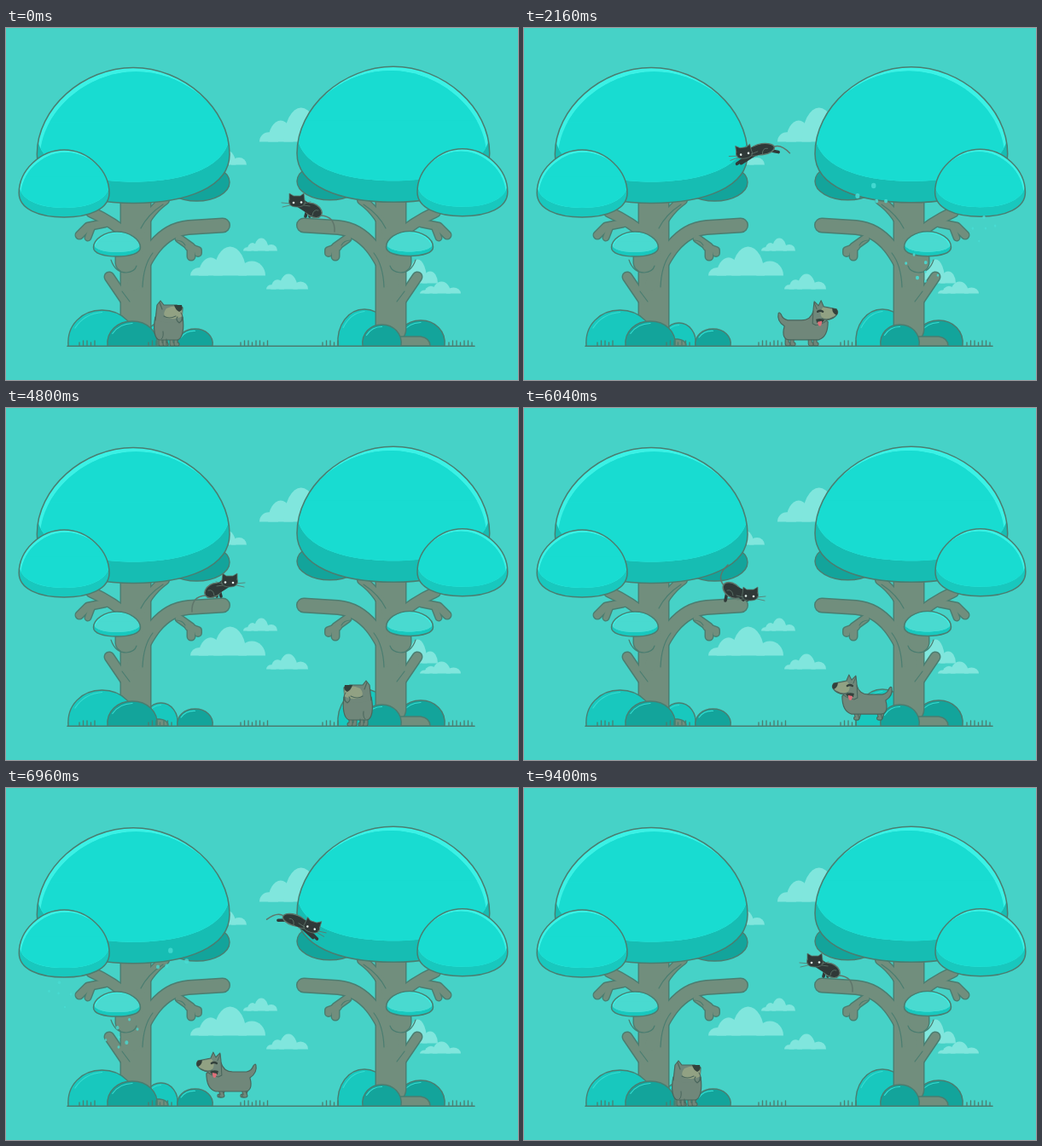
An HTML page with a canvas for the animation above (9440 ms loop, 600 by 413 pixels).

```html
<!DOCTYPE html>
<html lang="en">
<head>
<meta charset="utf-8">
<title>Cat and dog</title>
<style>
html, body { margin: 0; width: 100%; height: 100%; overflow: hidden; background: #46d2c7; }
canvas { display: block; }
</style>
</head>
<body>
<canvas id="stage" width="600" height="413"></canvas>
<script>
const ctx = document.getElementById('stage').getContext('2d');
const HALF = 4720, MIRROR = 603;
const LEAP = 1860, LAND = 2380, PERCH = 2680;
const RUN_START = 1220, RUN_END = 2650, DOWN = 4250;
const C = {
  sky: '#46d2c7', cloud: '#80e6dd', line: '#4a7d70', bark: '#718e7d',
  leaf: '#18dcd1', rim: '#3bf1e5', shade: '#16bdb3', deep: '#13a49b', bush: '#18c8be',
  paleLeaf: '#49dad0', paleShade: '#18c8be',
  cat: '#303938', fur: '#5f766b', dog: '#70877a', dogLine: '#49665c',
  muzzle: '#91a183', nose: '#33413c', tongue: '#dd6f79'
};

const clamp = v => Math.max(0, Math.min(1, v));
const lerp = (a, b, u) => a + (b - a) * u;
const ease = u => { u = clamp(u); return u * u * (3 - 2 * u); };

function group(draw, x = 0, y = 0, angle = 0, sx = 1) {
  ctx.save();
  ctx.translate(x, y);
  ctx.scale(sx, 1);
  ctx.rotate(angle);
  draw();
  ctx.restore();
}
const mirrored = (on, draw) => on ? group(draw, MIRROR, 0, 0, -1) : group(draw);

function paint(path, fill, stroke, width = 1.4) {
  if (fill) { ctx.fillStyle = fill; ctx.fill(path); }
  if (stroke) { ctx.strokeStyle = stroke; ctx.lineWidth = width; ctx.stroke(path); }
}
const shape = (d, fill, stroke, width) => paint(new Path2D(d), fill, stroke, width);
function oval(x, y, rx, ry, fill, stroke, angle = 0) {
  const p = new Path2D();
  p.ellipse(x, y, rx, ry, angle, 0, Math.PI * 2);
  paint(p, fill, stroke);
}

// Rounded foliage, widest at about two thirds of its height
function domePath(x, y, w, h) {
  const m = y + h * 0.64, c = x + w / 2, r = x + w, b = y + h;
  return new Path2D(`M${x},${m} C${x},${y + h * 0.3} ${x + w * 0.24},${y} ${c},${y}
    C${r - w * 0.24},${y} ${r},${y + h * 0.3} ${r},${m}
    C${r},${b - h * 0.12} ${r - w * 0.22},${b} ${c},${b}
    C${x + w * 0.22},${b} ${x},${b - h * 0.12} ${x},${m}Z`);
}

function dome(x, y, w, h, depth, leaf = C.leaf, shade = C.shade) {
  const p = domePath(x, y, w, h);
  const lit = (fill) => {
    paint(domePath(x, y - depth, w, h), fill);
    ctx.fillRect(x, y, w, h * 0.4);
  };
  ctx.save();
  ctx.clip(p);
  paint(p, shade);
  lit(C.rim);
  ctx.clip(domePath(x + w * 0.012 + 0.7, y + h * 0.022 + 1.2, w, h));
  lit(leaf);
  ctx.restore();
  paint(p, null, C.line, 1.5);
}

function bush(x, top, w, fill) {
  const h = 373 - top, r = x + w;
  const arc = `M${x},373 C${x - 2},${top + h * 0.42} ${x + w * 0.2},${top} ${x + w / 2},${top}
    C${r - w * 0.2},${top} ${r + 2},${top + h * 0.42} ${r},373`;
  shape(arc + 'Z', fill);
  shape(arc, null, C.line);
  shape(`M${x + w * 0.1},${top + h * 0.5} Q${x + w * 0.24},${top + h * 0.1} ${x + w * 0.5},${top + 2.5}`,
    null, '#36dcd1', 1.2);
}

function cloud(x, y, w, h) {
  ctx.fillStyle = C.cloud;
  for (const [cx, rx, ry] of [[0.12, 0.12, 0.28], [0.27, 0.16, 0.62], [0.53, 0.22, 1], [0.82, 0.18, 0.5]]) {
    ctx.beginPath();
    ctx.ellipse(x + w * cx, y, w * rx, h * ry, 0, Math.PI, Math.PI * 2);
    ctx.fill();
  }
}

const LIMBS = [
  [36, 'M152,200V353'],
  [17, 'M150,300C164,268 180,237 214,234L254,231.5'],
  [11, 'M156,244Q164,218 186,202'],
  [10, 'M203,247L217,257V268'],
  [9, 'M214,257L225,261V264'],
  [13, 'M146,246Q126,228 100,216'],
  [10, 'M116,229L96,233L86,243'],
  [8, 'M101,233L96,246'],
  [12, 'M121,292L140,320'],
  [24, 'M140,270V275']
].map(([w, d]) => [w, new Path2D(d)]);

function wood() {
  for (const [w, p] of LIMBS) paint(p, null, C.line, w + 1);
  for (const [w, p] of LIMBS) paint(p, null, C.bark, w - 1.8);
  shape('M123,272Q128,287 141,287Q151,286 153,279M136,309L145,321M158,235Q166,219 184,207M160,304Q161,278 172,264M199,249Q207,249 210,255',
    null, C.line, 1.2);
}

function shake(age, size) {
  return age < 0 || age > 900 ? 0 : size * Math.exp(-age / 170) * Math.sin(age / 42);
}

function tree(jolt, lift) {
  oval(223.5, 181 - lift, 38.5, 22, C.deep, C.line);
  wood();
  group(() => dome(36.3, 46.5, 225.7, 159, 25), 0, jolt - lift);
  group(() => dome(15.2, 143, 105.8, 79, 11, C.leaf, C.paleShade), jolt * 0.7, jolt * 0.8 - lift);
  group(() => dome(102.5, 239, 55, 29, 5, C.paleLeaf, C.paleShade), 0, jolt * 0.5 - lift * 0.5);
}

function scenery(rightJolt, leftJolt) {
  ctx.fillStyle = C.sky;
  ctx.fillRect(0, 0, 600, 413);
  cloud(297, 133.4, 92, 40);
  cloud(232, 160.4, 50, 17);
  cloud(216, 290.4, 88, 34);
  cloud(278, 261.4, 40, 15);
  cloud(305, 306.4, 49, 18);
  cloud(456, 299.4, 50, 28);
  cloud(485, 311.4, 48, 14);

  bush(389, 330, 62, C.bush);
  bush(458, 343, 56, C.deep);
  bush(162, 346, 39, C.bush);
  bush(201, 353, 41, C.deep);
  tree(leftJolt, 0);
  mirrored(true, () => tree(rightJolt, 1.2));
  shape('M462,373V362H486Q497,364 497,373Z', C.bark, C.line);
  shape('M168,373V365H180Q190,366 190,373Z', C.bark, C.line);
  bush(73, 331, 79, C.bush);
  bush(119, 344, 58, C.deep);
  bush(418, 348, 45, C.deep);
  shape('M72,373.3H549', null, C.line, 1.6);
  for (const [x, n] of [[86, 5], [167, 7], [275, 8], [371, 5], [519, 7]])
    for (let i = 0; i < n; i++)
      shape(`M${x + i * 4.5},373v${i % 3 ? -6 : -4}`, null, C.line, 1.3);
}

// Leaves shaken loose: x, y, radius about 300 ms into the fall
const LEAVES = [
  [409, 185, 3.2], [391, 197, 3], [425, 203, 2.4], [414, 203, 2.4],
  [539, 222, 2], [525, 235, 1.6], [540, 235, 1.5], [552, 232, 1.6], [534, 250, 1.3],
  [458, 266, 1.8], [471, 275, 2.2], [447, 276, 1.8], [460, 293, 2.4],
  [470, 286, 1.7], [471, 297, 1.7], [486, 290, 1.6]
];
function leaves(age) {
  if (age < 0 || age > 1000) return;
  ctx.globalAlpha = clamp(age / 80) * clamp((1000 - age) / 800);
  LEAVES.forEach(([x, y, r], i) => {
    const fall = (age - 300) * (0.07 + (i % 3) * 0.008);
    oval(x + (age - 300) * 0.012 + Math.sin(age / 130 + i), y + fall, r * 0.85, r, '#48dcd3');
  });
  ctx.globalAlpha = 1;
}

// Poses around the middle of the body; body is x, y, angle
const SIT = { head: [-14, -11], body: [5, 0, 0.55], size: [11, 7.5], tail: [14, 6, 31, 7, 30, 25], front: [-4, 7], rear: [11, 7] };
const CROUCH = { head: [-17, 5], body: [4, 0, -0.6], size: [12, 8], tail: [14, -6, 23, -17, 9, -30], front: [-14, 11], rear: [12, 12] };
const FLY = { head: [-17, -1], body: [5, -2, 0], size: [14, 6.5], tail: [16, -2, 26, -7, 36, 7], front: [-27, 11], rear: [23, 4] };
function blend(a, b, u) {
  const pose = {};
  for (const k in a) pose[k] = a[k].map((v, i) => lerp(v, b[k][i], u));
  return pose;
}

function cat(pose, wiggle = 0) {
  const [hx, hy] = pose.head, [bx0, by, angle] = pose.body, bx = bx0 + wiggle;
  const [tx, ty, cx, cy, ex, ey] = pose.tail;
  shape(`M${tx},${ty}Q${cx},${cy} ${ex + wiggle},${ey}`, null, C.fur, 1.5);
  shape(`M${bx - 7},${by}L${pose.front}M${bx - 3},${by + 2}L${pose.front[0] + 5},${pose.front[1]}
    M${bx + 6},${by + 2}L${pose.rear}`, null, C.cat, 3.6);
  oval(bx, by, ...pose.size, C.cat, C.fur, angle);
  shape(`M${hx + 3},${hy + 2}L${bx - 2},${by}`, null, C.cat, 11);
  shape(`M${bx - 1},${by + 6}Q${bx},${by - 2} ${bx + 6},${by}`, null, C.fur, 0.8);
  group(() => {
    shape('M-9,-2L-9,-9L-4,-6H4L8,-9L9,-1C11,4 7,7 0,7C-7,7 -11,4 -9,-2Z', C.cat, C.fur, 0.8);
    shape('M-8,3L-18,2M-8,5L-17,7M8,3L16,1M8,5L15,6', null, C.fur, 0.8);
    oval(-4, 2, 1.3, 1.3, '#e7f6ee');
    oval(5, 1.5, 1.3, 1.3, '#e7f6ee');
  }, hx, hy);
}

function drawCat(p) {
  if (p < LEAP) {
    const wiggle = p > 1350 ? Math.sin((p - 1350) / 45) * 1.2 : 0;
    group(() => cat(blend(SIT, CROUCH, ease((p - 1000) / 260)), wiggle), 355, 214);
  } else if (p < LAND) {
    const u = (p - LEAP) / (LAND - LEAP);
    const x = 355 - 107 * (1 - Math.pow(1 - u, 1.6));
    const y = 143 + 71 * Math.pow((p - 2120) / 260, 2);
    const stretch = Math.min(clamp(u * 6), clamp((1 - u) * 6));
    group(() => cat(blend(CROUCH, FLY, stretch)), x, y, lerp(0.5, -0.6, u) * stretch);
  } else if (p < PERCH) {
    group(() => cat(CROUCH), 248, 214);
  } else {
    mirrored(true, () => group(() => cat(blend(CROUCH, SIT, ease((p - PERCH) / 240))), 355, 214));
  }
}

function dogHead(open, panting) {
  if (open > 0) {
    group(() => shape('M-8,4L9,5Q13,8 8,12L-6,14Z', C.dog, C.dogLine, 1), -4, 3, open * 0.35);
    shape('M-6,4L11,4L7,11L-5,11Z', '#5d4c49');
  }
  shape('M-11,12L-10,-6L-9,-14L-4,-9L-1,-15L2,-8L17,-5Q20,-1 17,2Q14,6 6,8Q0,13 -7,14Z', C.dog, C.dogLine, 1.1);
  shape('M1,-7L17,-4Q18,1 13,4Q6,8 0,5Q-4,-1 1,-7Z', C.muzzle);
  shape('M12,-6L17,-5Q20,-1 17,2Q12,0 12,-6Z', C.nose);
  shape('M-5,-2Q-2,-4 1,-2', null, C.nose, 2.4);
  shape('M13,5Q6,9 0,6', null, C.dogLine, 1.1);
  shape('M-9,-12L-6,-5', null, C.dogLine, 1);
  if (panting) {
    shape('M-7,7Q-1,5 3,8L0,11H-6Z', C.nose);
    shape('M-5,10Q-5,15 -2,15Q0,14 0,9Z', C.tongue);
  }
}

function legs(xs, swing, top = -12) {
  xs.forEach((x, i) => {
    const d = `M${x},${top}L${x + (i % 2 ? -swing : swing)},-2h2`;
    shape(d, null, C.dogLine, 5);
    shape(d, null, C.dog, 3);
  });
}

function walkingDog(p) {
  const beat = p / 160 * Math.PI;
  const hop = Math.abs(Math.cos(beat)) * 10;
  group(() => {
    legs([-23, -17, 4, 10], Math.cos(beat) * 4);
    shape('M-33,-38Q-35,-29 -26,-23C-29,-12 -26,-7 -20,-7L14,-7C21,-9 25,-16 25,-28L8,-41Q5,-30 -6,-30L-22,-30Q-28,-31 -30,-37Q-32,-40 -33,-38Z',
      C.dog, C.dogLine, 1.2);
    group(() => dogHead(0, true), 18, -38);
  }, 331 + 0.15 * (p - 2160), 373 - hop);
}

function sittingDog() {
  group(() => {
    legs([-9, -4, 4, 9], 0);
    shape('M-15,-34C-18,-20 -16,-8 -10,-7H11C17,-9 19,-20 17,-34Z', C.dog, C.dogLine, 1.2);
    shape('M-15,-30L-13,-48L-9,-53L-5,-48H10L17,-45L16,-30Q14,-27 0,-27Z', C.dog);
    shape('M-15,-30L-13,-48L-9,-53L-5,-48H10L17,-45L16,-30', null, C.dogLine, 1.2);
    shape('M-2,-44Q6,-48 16,-46L17,-35Q9,-30 -3,-33Q-7,-38 -2,-44Z', C.muzzle);
    shape('M7,-48H16Q18,-42 13,-40Q8,-43 7,-48Z', C.nose);
    shape('M-5,-35Q1,-31 9,-35M-10,-51L-7,-43M15,-39Q20,-32 13,-27Q8,-31 11,-34', null, C.dogLine, 1.1);
    shape('M-2,-8V-1M-6,-17Q-5,-10 -8,-8', null, C.dogLine, 1);
  }, 190, 373);
}

function barkingDog(p) {
  const bark = Math.max(0, Math.sin((p - 3260) / 400 * Math.PI * 2));
  const rise = ease((p - RUN_END) / 220) * ease((DOWN - p) / 180);
  group(() => {
    group(() => {
      const arms = 'M14,-37L28,-33L31,-36M13,-43L25,-40', hind = 'M7,-14L11,-6L9,-3H12';
      for (const d of [arms, hind]) {
        shape(d, null, C.dogLine, 5);
        shape(d, null, C.dog, 3);
      }
      shape('M-27,-32Q-21,-23 -14,-24C-6,-31 -7,-41 -9,-52L15,-56C20,-44 22,-30 18,-20Q14,-10 3,-9L1,-2H-5L-4,-8Q-14,-11 -17,-18Q-26,-23 -27,-32Z',
        C.dog, C.dogLine, 1.2);
      shape('M1,-19Q9,-18 9,-11', null, C.dogLine, 1.2);
    }, 0, 0, (1 - rise) * 0.55);
    group(() => dogHead(0.3 + bark, false), lerp(14, 4, rise), lerp(-42, -60, rise) - bark,
      -rise * (1.35 + bark * 0.1), -1);
    if (bark > 0.15 && rise > 0.9) {
      for (const a of [-2.4, -2.05, -1.7, -1.1, -0.65]) {
        const x = Math.cos(a), y = Math.sin(a), r = 26 + bark * 6;
        shape(`M${x * r},${-63 + y * r}l${x * 3},${y * 3}`, null, '#93eee4', 1.3);
      }
    }
  }, 405, 373);
}

function drawDog(p) {
  if (p < RUN_START) sittingDog();
  else if (p < RUN_END) walkingDog(p);
  else if (p < DOWN) barkingDog(p);
  else mirrored(true, sittingDog);
}

function frame(now) {
  const t = now % (HALF * 2), flip = t >= HALF, p = t % HALF;
  const takeoff = shake(p - LEAP, 4), landing = shake(p - LAND, 3);
  ctx.lineCap = ctx.lineJoin = 'round';
  scenery(flip ? landing : takeoff, flip ? takeoff : landing);
  mirrored(flip, () => {
    leaves(p - LEAP);
    drawDog(p);
    drawCat(p);
  });
}

const start = performance.now();
function loop() {
  frame(performance.now() - start);
  requestAnimationFrame(loop);
}
loop();
</script>
</body>
</html>
```
